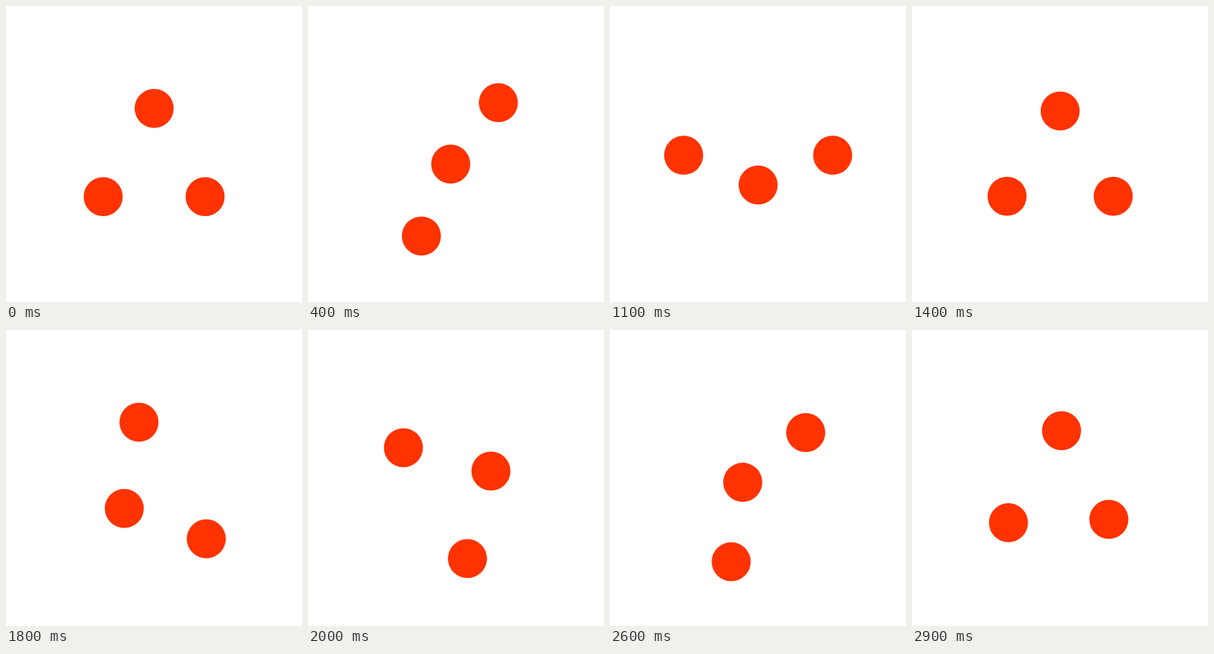
Recreate the animation shown at these times as an HTML page. Size 400 by 400 pixels, loop 3 s.

```html
<!DOCTYPE html>
<html lang="en">
<head>
<meta charset="utf-8">
<title>Three dots</title>
<style>
html, body { margin: 0; width: 100%; height: 100%; overflow: hidden; background: #fff; }
svg { display: block; width: 100%; height: 100%; }
</style>
</head>
<body>
<svg viewBox="0 0 400 400" fill="#ff3300">
  <circle r="26.4"/>
  <circle r="26.4"/>
  <circle r="26.4"/>
</svg>
<script>
const LOOP = 3000, PHASE = 750, EASE_TIME = 775, STEP = 100;
const CX = 200.2, CY = 217.8, R = 79.5, BULGE = 25;
const dots = document.querySelectorAll('circle');

// Cubic Bezier ease (.7, 0, .3, 1), solved for x by bisection
function ease(x) {
  let lo = 0, hi = 1;
  for (let i = 0; i < 30; i++) {
    const s = (lo + hi) / 2, q = 1 - s;
    if (2.1 * s * q * q + 0.9 * s * s * q + s * s * s < x) lo = s;
    else hi = s;
  }
  return lo * lo * (3 - 2 * lo);
}

function place(dot, radius, degrees) {
  const a = degrees * Math.PI / 180;
  dot.setAttribute('cx', (CX + radius * Math.cos(a)).toFixed(2));
  dot.setAttribute('cy', (CY + radius * Math.sin(a)).toFixed(2));
}

// One dot crosses the centre while the other two swing out around it
function draw(ms) {
  const t = Math.floor((ms % LOOP) / STEP) * STEP;
  const phase = Math.floor(t / PHASE);
  const p = ease((t - phase * PHASE) / EASE_TIME);
  const axis = 30 + 60 * phase;
  const swing = 120 - 60 * p;
  const outer = R + BULGE * Math.pow(Math.sin(Math.PI * p), 0.9);
  place(dots[0], R * (1 - 2 * p), axis);
  place(dots[1], outer, axis - swing);
  place(dots[2], outer, axis + swing);
}

function tick() {
  draw(performance.now());
  requestAnimationFrame(tick);
}
tick();
</script>
</body>
</html>
```
